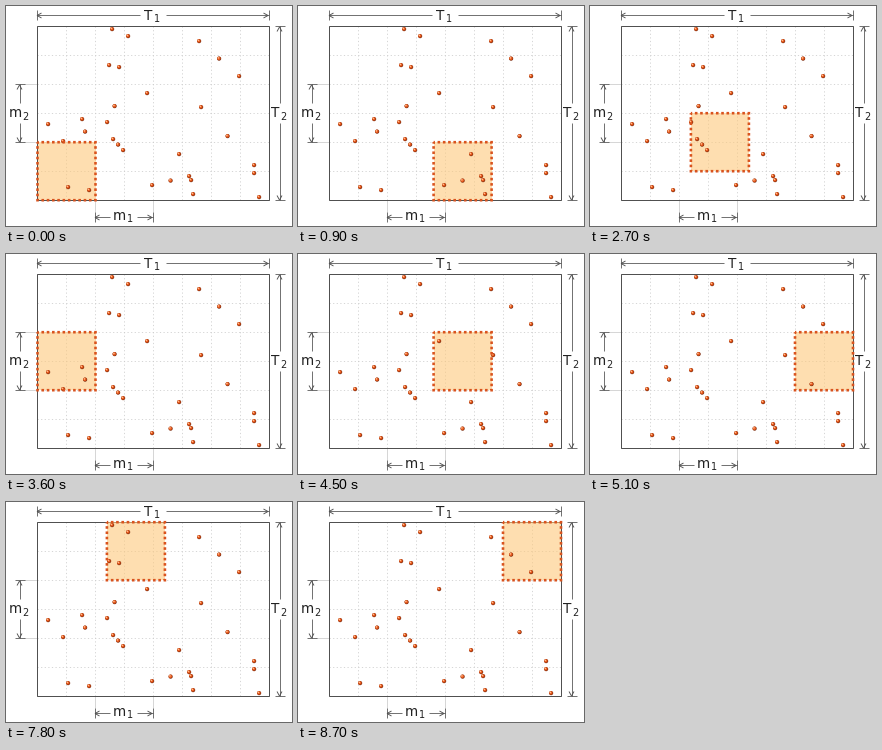
Animation, 286 px wide and 220 px high, one loop 9 s. Source, as a matplotlib script:

```python
import matplotlib.pyplot as plt
import numpy as np
from matplotlib.animation import FuncAnimation
from matplotlib.patches import Circle, Rectangle

W, H, DPI = 286, 220, 100
PX = 72 / DPI                      # points per pixel
CELL, COLS, ROWS = 29, 8, 6
LEFT, TOP = 30.5, 20.5
RIGHT, BOTTOM = LEFT + COLS * CELL, TOP + ROWS * CELL
SIDE = 2 * CELL
FRAMES, STEP_MS, PER_ROW = 30, 300, 6
INK, GRID, EDGE, FILL = "#505050", "#cccccc", "#d9531e", "#fec97c"

# The scatter is laid out as short strands, given by their end points
TRIOS = [((193, 35), (233, 70)), ((195, 101), (248, 159)),
         ((141, 87), (76, 113)), ((107, 133), (117, 144)),
         ((101, 116), (57, 135)), ((146, 179), (183, 170))]
PAIRS = [((106, 23), (122, 30)), ((103, 59), (113, 61)),
         ((62, 181), (83, 184)), ((42, 118), (173, 148)),
         ((185, 174), (187, 188)), ((248, 167), (253, 191))]

fig = plt.figure(figsize=(W / DPI, H / DPI), dpi=DPI, facecolor="white")
ax = fig.add_axes([0, 0, 1, 1])
ax.set_xlim(0, W)
ax.set_ylim(H, 0)
ax.axis("off")


def line(a, b, color=INK, width=1, z=2, ls="-"):
    ax.plot([a[0], b[0]], [a[1], b[1]], color=color, lw=width * PX, ls=ls,
            zorder=z, solid_capstyle="butt")


def dimension(start, end, at, gap, vertical=False):
    """Two arrows pointing outwards from a central gap, with end ticks."""
    def place(along, across):
        return (across, along) if vertical else (along, across)

    middle = (start + end) / 2
    for tip, sign in ((start, 1), (end, -1)):
        line(place(tip, at), place(middle - sign * gap / 2, at), width=0.8)
        line(place(tip, at - 5), place(tip, at + 5), width=0.8)
        for side in (-2.5, 2.5):
            line(place(tip + sign * 0.5, at),
                 place(tip + sign * 5, at + side), width=0.9)


def label(x, y, letter, digit):
    style = dict(family="DejaVu Sans", color="#222222", va="baseline", zorder=4)
    ax.text(x, y, letter, size=13.5 * PX, **style)
    shift = 9 if letter == "T" else 13.5
    ax.text(x + shift, y + 2.5, digit, size=9.8 * PX, **style)


def ball(x, y):
    for shift, r, color in ((0.1, 2.1, "#7d2a0c"), (-0.15, 1.7, "#e8591c"),
                            (-0.6, 0.8, "#ffbd90")):
        ax.add_patch(Circle((x + shift, y + shift), r, fc=color, ec="none",
                            zorder=5))


for x in LEFT + CELL * np.arange(1, COLS):
    line((x, TOP), (x, BOTTOM), GRID, 0.8, 1, (0, (1.5, 3)))
for y in TOP + CELL * np.arange(1, ROWS):
    line((LEFT, y), (RIGHT, y), GRID, 0.8, 1, (0, (1.5, 3)))
ax.add_patch(Rectangle((LEFT, TOP), RIGHT - LEFT, BOTTOM - TOP, fill=False,
                       ec=INK, lw=PX, zorder=3))

# Pale extension lines and dimensions for the two inner intervals
for k in (2, 4):
    x, y = LEFT + k * CELL, TOP + k * CELL
    line((x, BOTTOM), (x, 206), GRID, 0.8, 1)
    line((18, y), (LEFT, y), GRID, 0.8, 1)
dimension(LEFT, RIGHT, 9.5, 26)
dimension(TOP, BOTTOM, 273.5, 20, vertical=True)
dimension(LEFT + 2 * CELL, LEFT + 4 * CELL, 211.5, 27)
dimension(TOP + 2 * CELL, TOP + 4 * CELL, 13.5, 20, vertical=True)
label(138.5, 14, "T", "1")
label(265, 111, "T", "2")
label(107, 214, "m", "1")
label(3, 111, "m", "2")

for count, strands in ((3, TRIOS), (2, PAIRS)):
    for a, b in strands:
        for point in np.linspace(a, b, count):
            ball(*point)

DASH = 2.6
fill = Rectangle((0, 0), SIDE, SIDE, fc=FILL, alpha=0.6, ec="none", zorder=4)
edge = Rectangle((0, 0), SIDE, SIDE, fill=False, ec=EDGE, lw=DASH * PX,
                 ls=(0.5, (1, SIDE / 11 / DASH - 1)), snap=False, zorder=6)
ax.add_patch(fill)
ax.add_patch(edge)


def update(frame):
    row, step = divmod(frame, PER_ROW)
    if row % 2:                    # odd rows run right to left
        step = PER_ROW - 1 - step
    corner = (31.5 + 34.7 * step, 136.2 - CELL * row)
    for patch in (fill, edge):
        patch.set_xy(corner)
    return fill, edge


anim = FuncAnimation(fig, update, frames=FRAMES, interval=STEP_MS,
                     repeat=True, repeat_delay=0, blit=False)
plt.show()
```
